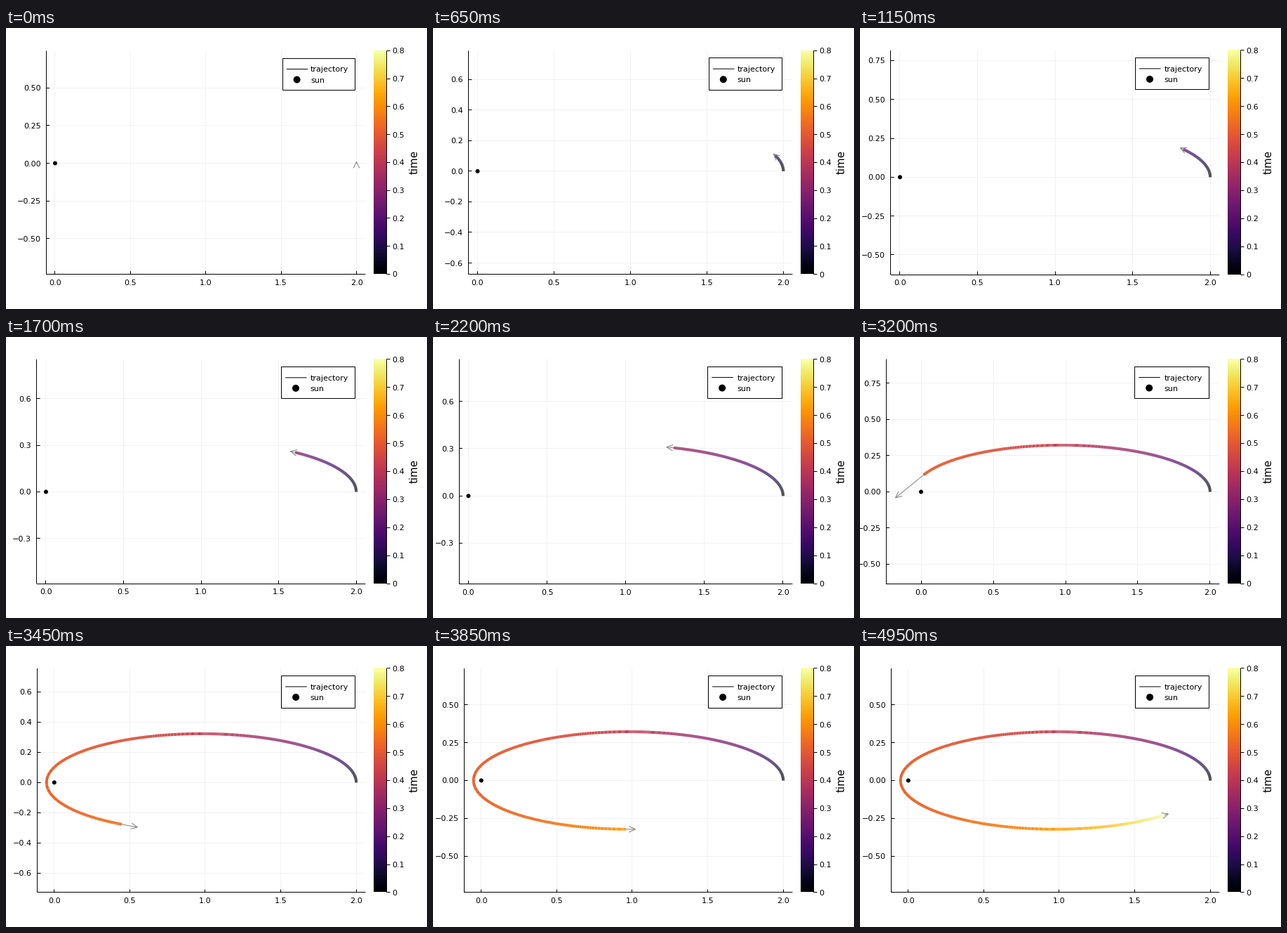
Write a matplotlib script that moves like this. It is 600 px wide and 400 px high and loops after 5 s.

```python
import math

import matplotlib.pyplot as plt
import numpy as np
from matplotlib.animation import FuncAnimation
from matplotlib.collections import LineCollection

W, H, DPI = 600, 400, 100
PX = 72 / DPI                      # one pixel in points
FRAMES, INTERVAL = 100, 50
SUBSTEPS = 10                      # trail segments per frame
DT = 0.00805 / SUBSTEPS
T_MAX = 0.8
ARROW_TIME = 0.01
RIGHT = 512.4
GRID, GRAY = "#f1f1f1", "#808080"

plt.rcParams["font.family"] = "DejaVu Sans"
CMAP = plt.get_cmap("inferno")

# Kepler orbit released at aphelion (2, 0) with velocity (0, 1)
GM = 4 * math.pi ** 2
A = 1 / (1 - 1 / GM)
ECC = 2 / A - 1
B = A * math.sqrt(1 - ECC ** 2)
MEAN_MOTION = math.sqrt(GM / A ** 3)


def orbit(t):
    """Position and velocity at times t."""
    mean = MEAN_MOTION * t - math.pi
    ecc = mean + ECC * np.sign(mean)
    for _ in range(30):
        ecc = ecc - (ecc - ECC * np.sin(ecc) - mean) / (1 - ECC * np.cos(ecc))
    rate = MEAN_MOTION / (1 - ECC * np.cos(ecc))
    pos = np.column_stack([A * (ECC - np.cos(ecc)), -B * np.sin(ecc)])
    vel = np.column_stack([A * np.sin(ecc) * rate, -B * np.cos(ecc) * rate])
    return pos, vel


TIMES = np.arange((FRAMES - 1) * SUBSTEPS + 1) * DT
POS, VEL = orbit(TIMES)
COLORS = CMAP(TIMES / T_MAX)


def nice_ticks(lo, hi):
    """Best scored tick positions and their number of decimals."""
    best = None
    for power in range(1, -5, -1):
        for base, nice in ((5, 0.9), (3, 0.2), (2.5, 0.5), (2, 0.7), (1, 1.0)):
            step = base * 10.0 ** power
            first, last = math.ceil(lo / step), math.floor(hi / step)
            count = last - first + 1
            if not 4 <= count <= 8:
                continue
            fit = 1 - abs(count - 5) / 5
            cover = (hi - lo) / ((count - 1) * step)
            score = fit / 4 + cover / 2 + nice / 4
            if best is None or score > best[0] + 1e-9:
                best = score, step, first, last
    _, step, first, last = best
    digits = next(d for d in range(1, 8) if abs(round(step, d) - step) < 1e-9)
    return [k * step for k in range(first, last + 1)], digits


def padded(lo, hi):
    pad = 0.03 * (hi - lo)
    return lo - pad, hi + pad


def crisp(v):
    """Centre of the pixel that holds v."""
    return math.floor(v) + 0.5


fig = plt.figure(figsize=(W / DPI, H / DPI), dpi=DPI, facecolor="white")
ax = fig.add_axes([0, 0, 1, 1])


def line(xs, ys, color="black", zorder=2):
    ax.plot(xs, ys, color=color, lw=PX, snap=False, zorder=zorder,
            solid_capstyle="butt", solid_joinstyle="miter")


def h_line(x0, x1, y, color="black", zorder=2):
    line([x0, x1], [crisp(y)] * 2, color, zorder)


def v_line(x, y0, y1, color="black", zorder=2):
    line([crisp(x)] * 2, [y0, y1], color, zorder)


def label(x, y, text, ha, zorder=3):
    """Text whose digits are centred on height y."""
    ax.text(x, y + 4, text, ha=ha, va="baseline", fontsize=11.1 * PX, zorder=zorder)


def dot(x, y, radius, zorder):
    ax.add_patch(plt.Circle((x, y), radius, fc="black", ec="none", zorder=zorder))


def number(value, digits):
    return f"{value + 0.0:.{digits}f}".replace("-", "\u2212")


def draw_axes(left, top, bottom, x_lim, y_lim, to_px):
    x_ticks, x_digits = nice_ticks(*x_lim)
    y_ticks, y_digits = nice_ticks(*y_lim)
    for v in x_ticks:
        x = to_px((v, 0))[0]
        v_line(x, top, bottom, GRID, 1)
        v_line(x, bottom - 4.5, bottom)
        label(x, bottom + 11.2, number(v, x_digits), "center")
    for v in y_ticks:
        y = to_px((0, v))[1]
        h_line(left, RIGHT, y, GRID, 1)
        h_line(left, left + 5, y)
        label(left - 7.4, y, number(v, y_digits), "right")
    v_line(left, top, bottom)
    h_line(left, RIGHT, bottom)


def draw_colorbar(top, bottom):
    ramp = np.linspace(1, 0, 256)[:, None]
    ax.imshow(ramp, cmap=CMAP, vmin=0, vmax=1, aspect="auto", zorder=2,
              extent=[524, 542, math.floor(bottom), math.floor(top)])
    v_line(542.5, top, bottom, zorder=3)
    for k in range(9):
        y = bottom + (top - bottom) * k / 8
        h_line(542.5, 547.5, y, zorder=3)
        label(550.4, y, f"{k / 10:.1f}" if k else "0", "left")
    ax.text(582, 191.5, "time", rotation=90, ha="center", va="center",
            fontsize=15 * PX)


def draw_legend(shift):
    left, right = crisp(394.5 - 3 * shift), crisp(497.3)
    top, bottom = crisp(43 - shift), crisp(88.6 - shift)
    ax.add_patch(plt.Rectangle((left, top), right - left, bottom - top, fc="white",
                               ec="black", lw=PX, snap=False, zorder=6))
    x, y = 399.7 - 2.6 * shift, 58.5 - shift
    line([x, x + 30.5], [y, y], zorder=7)
    dot(x + 14.9, y + 15, 5, 7)
    label(434.2 - shift, y, "trajectory", "left", 7)
    label(434.2 - shift, y + 15, "sun", "left", 7)


def draw_arrow(start, tip):
    line([start[0], tip[0]], [start[1], tip[1]], GRAY, 5)
    angle = math.atan2(tip[1] - start[1], tip[0] - start[0])
    legs = [tip - 10 * np.array([math.cos(angle + s), math.sin(angle + s)])
            for s in (-0.44, 0.44)]
    xs, ys = zip(legs[0], tip, legs[1])
    line(xs, ys, GRAY, 5)


def draw(frame):
    ax.clear()
    ax.axis("off")

    last = frame * SUBSTEPS
    trail = POS[:last + 1]
    tip = POS[last] + ARROW_TIME * VEL[last]
    data = np.vstack([trail, tip, (0, 0)])
    (x_min, y_min), (x_max, y_max) = data.min(axis=0), data.max(axis=0)

    # the left margin follows the labels the plain y range would need
    ticks, digits = nice_ticks(*padded(y_min, y_max))
    left = 37 + 6.7 * (digits - 1) + (7.6 if ticks[0] < -1e-9 else 0)
    shift = (57.1 - left) * 0.047
    top, bottom = 32.5 - shift, 350.4 + shift

    # equal scales on both axes, y centred on the data
    x_lim = padded(x_min, x_max)
    scale = (RIGHT - left) / (x_lim[1] - x_lim[0])
    y_mid = (y_min + y_max) / 2
    half = (bottom - top) / 2 / scale

    def to_px(p):
        p = np.asarray(p, dtype=float)
        return np.stack([left + (p[..., 0] - x_lim[0]) * scale,
                         (top + bottom) / 2 - (p[..., 1] - y_mid) * scale], axis=-1)

    draw_colorbar(top, bottom)
    draw_axes(left, top, bottom, x_lim, (y_mid - half, y_mid + half), to_px)

    if last:
        pts = to_px(trail)
        segments = np.stack([pts[:-1], pts[1:]], axis=1)
        ax.add_collection(LineCollection(segments, colors=COLORS[:last], lw=4 * PX,
                                         capstyle="butt", snap=False, zorder=3))
    dot(*to_px((0, 0)), 3, 4)
    draw_arrow(to_px(POS[last]), to_px(tip))
    draw_legend(shift)
    ax.set(xlim=(0, W), ylim=(H, 0))
    return []


anim = FuncAnimation(fig, draw, frames=FRAMES, interval=INTERVAL,
                     init_func=lambda: draw(0), repeat=True, repeat_delay=0)
plt.show()
```
